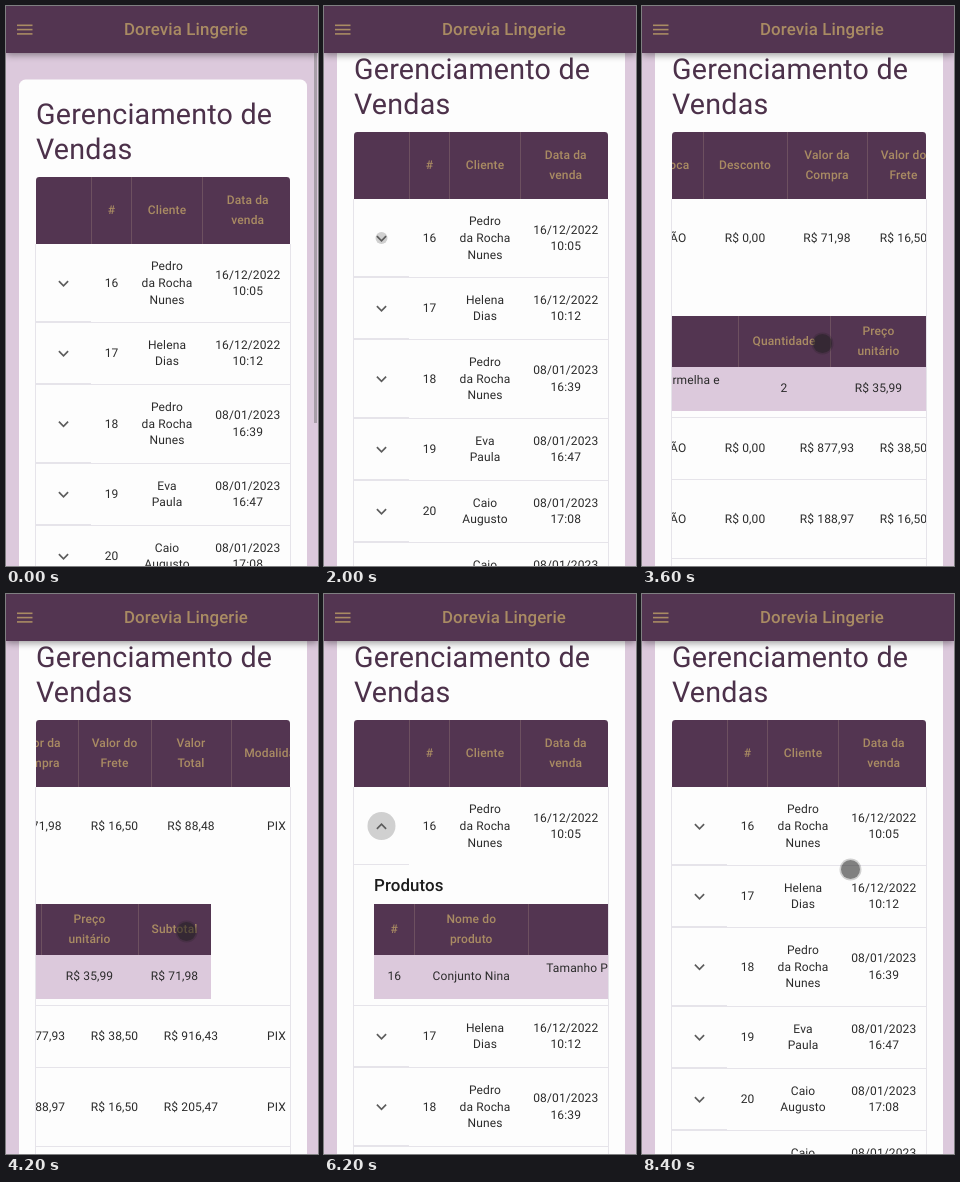
Recreate the animation shown at these times as an HTML page with a canvas. Size 312 by 560 pixels, loop 9200 ms.

```html
<!DOCTYPE html>
<html lang="pt-BR">
<head>
<meta charset="utf-8">
<title>Gerenciamento de Vendas</title>
<style>
html, body { margin: 0; width: 100%; height: 100%; overflow: hidden; background: #dcc9dc; }
canvas { display: block; }
</style>
</head>
<body>
<canvas id="stage" width="312" height="560"></canvas>
<script>
const ctx = document.getElementById('stage').getContext('2d');
ctx.textRendering = 'geometricPrecision';
const LOOP = 9200, STEP = 200;
const C = {
  page: '#dcc9dc', card: '#fdfdfd', bar: '#533551', gold: '#a98b63', rule: '#6d5060',
  line: '#e6e4ea', text: '#2b2b2b', title: '#4c314a', icon: '#5c5c5c', ripple: '#d0d0d0', ok: '#0a800a'
};
const CELL = 12, LINE = 16.9, HEAD_LINE = 20.2;

// Timelines as [ms, value] pairs, linear in between.
const PAGE_SCROLL = [[800, 0], [1000, 8], [1200, 24], [1400, 38], [1600, 45]];
const TABLE_SCROLL = [[2600, 0], [2800, 50], [3000, 134], [3400, 300], [3800, 450], [4200, 528],
  [4400, 528], [4600, 560], [4800, 560], [5000, 440], [5200, 270], [5400, 127], [5600, 50], [5800, 12], [6000, 0]];
const DETAILS = [[2000, 0], [2200, 60], [2400, 134], [2600, 140], [6800, 140], [7000, 125], [7200, 50], [7400, 5], [7600, 0]];
const RIPPLE = [[1800, 0], [2000, 6], [2200, 14], [7400, 14], [7800, 0]];

// Column edges in table coordinates.
const EDGES = [30, 85.5, 125.5, 196.5, 287, 377.5, 436, 520, 600, 673, 753, 844];
const HEADS = ['', '#', 'Cliente', 'Data da|venda', 'Data de|envio', 'Troca', 'Desconto',
  'Valor da|Compra', 'Valor do|Frete', 'Valor|Total', 'Modalidade'];
const SUB_EDGES = [50, 90.5, 204, 471, 563, 660, 733];
const SUB_HEADS = ['#', 'Nome do|produto', 'Descrição', 'Quantidade', 'Preço|unitário', 'Subtotal'];
const SUB_ROW = ['16', 'Conjunto Nina', 'Tamanho P e M, na cor branca, vermelha e|azul royal.', '2', 'R$ 35,99', 'R$ 71,98'];

const sale = (id, client, date, sent = 'check', ...values) =>
  ['', id, client, date, sent, 'NÃO', 'R$ 0,00', ...values, 'PIX'];
const ROWS = [
  { h: 78, cells: sale('16', 'Pedro|da Rocha|Nunes', '16/12/2022|10:05', '16/12/2022|10:06', 'R$ 71,98', 'R$ 16,50', 'R$ 88,48') },
  { h: 62, cells: sale('17', 'Helena|Dias', '16/12/2022|10:12', 'check', 'R$ 877,93', 'R$ 38,50', 'R$ 916,43') },
  { h: 79, cells: sale('18', 'Pedro|da Rocha|Nunes', '08/01/2023|16:39', 'check', 'R$ 188,97', 'R$ 16,50', 'R$ 205,47') },
  { h: 62, cells: sale('19', 'Eva|Paula', '08/01/2023|16:47') },
  { h: 62, cells: sale('20', 'Caio|Augusto', '08/01/2023|17:08') },
  { h: 62, cells: sale('21', 'Caio|Augusto', '08/01/2023|17:10') }
];

function track(t, keys) {
  if (t <= keys[0][0]) return keys[0][1];
  for (let i = 1; i < keys.length; i++) {
    const [t0, v0] = keys[i - 1], [t1, v1] = keys[i];
    if (t <= t1) return v0 + (v1 - v0) * (t - t0) / (t1 - t0);
  }
  return keys[keys.length - 1][1];
}

function rect(x, y, w, h, color) {
  ctx.fillStyle = color;
  ctx.fillRect(x, y, w, h);
}

function disc(x, y, r, color) {
  ctx.fillStyle = color;
  ctx.beginPath();
  ctx.arc(x, y, r, 0, Math.PI * 2);
  ctx.fill();
}

function stroke(points, color, width) {
  ctx.strokeStyle = color;
  ctx.lineWidth = width;
  ctx.beginPath();
  points.forEach(([x, y]) => ctx.lineTo(x, y));
  ctx.stroke();
}

function label(text, x, y, size, color, weight = 400, align = 'left', spacing = 0.0107) {
  ctx.font = `${weight} ${size}px Roboto, sans-serif`;
  ctx.letterSpacing = size * spacing + 'px';
  ctx.textAlign = align;
  ctx.fillStyle = color;
  ctx.fillText(text, x, y);
}

// Lines separated by "|" are centred around the point.
function cell(text, x, y, lineHeight, color, weight) {
  const lines = text.split('|');
  lines.forEach((line, i) =>
    label(line, x, Math.round(y + 4 + (i - (lines.length - 1) / 2) * lineHeight), CELL, color, weight, 'center'));
}

const center = (edges, i) => (edges[i] + edges[i + 1]) / 2;

function headRow(edges, heads, y, h) {
  const last = edges[edges.length - 1];
  rect(edges[0], y, last - edges[0], h, C.bar);
  heads.forEach((text, i) => {
    cell(text, center(edges, i), y + h / 2 - 0.5, HEAD_LINE, C.gold, 500);
    if (i) rect(Math.floor(edges[i]), y, 1, h, C.rule);
  });
}

function checkBox(x, y) {
  ctx.strokeStyle = C.ok;
  ctx.lineWidth = 2;
  ctx.beginPath();
  ctx.roundRect(x - 8.7, y - 8.7, 17.4, 17.4, 1.5);
  ctx.stroke();
  stroke([[x - 5, y], [x - 1.5, y + 3.5], [x + 5, y - 3.5]], C.ok, 1.8);
}

function chevron(x, y, up) {
  const d = up ? -2.3 : 2.3;
  stroke([[x - 4.6, y - d], [x, y + d], [x + 4.6, y - d]], C.icon, 1.7);
}

function details(y, h) {
  ctx.save();
  ctx.beginPath();
  ctx.rect(30, y, 814, h);
  ctx.clip();
  label('Produtos', 50, y + 26, 16.86, '#1c1c1c', 500, 'left', 0.0075);
  headRow(SUB_EDGES, SUB_HEADS, y + 39, 51);
  rect(50, y + 90, 683, 44, C.page);
  SUB_ROW.forEach((text, i) => cell(text, center(SUB_EDGES, i), y + 111, LINE, C.text));
  ctx.restore();
}

function table(t, top) {
  ctx.save();
  ctx.beginPath();
  ctx.roundRect(30, top, 254, 700, 3.4);
  ctx.clip();
  ctx.translate(-track(t, TABLE_SCROLL), 0);
  headRow(EDGES, HEADS, top, 67);
  let y = top + 67;
  ROWS.forEach(({ h, cells }, row) => {
    const mid = y + h / 2, open = row ? 0 : track(t, DETAILS);
    if (!row) disc(57.5, mid, track(t, RIPPLE), C.ripple);
    chevron(57.5, mid + 0.5, !row && t >= 2200 && t < 7000);
    cells.forEach((text, i) => {
      const x = center(EDGES, i);
      if (text === 'check') checkBox(x, mid);
      else cell(text, x, mid, LINE, C.text);
    });
    y += h;
    rect(30, y - 1, 55, 1, C.line);
    if (open) details(y, open);
    y += open;
    rect(30, y, 814, 1, C.line);
  });
  ctx.restore();
  rect(29, top + 67, 1, 600, C.line);
  rect(284, top + 67, 1, 600, C.line);
}

function appBar() {
  ctx.save();
  ctx.shadowColor = 'rgba(0,0,0,.4)';
  ctx.shadowBlur = 7;
  ctx.shadowOffsetY = 2;
  rect(0, 0, 312, 47, C.bar);
  ctx.restore();
  for (let i = 0; i < 3; i++) rect(11, 18.5 + i * 4.3, 15.5, 1.6, C.gold);
  label('Dorevia Lingerie', 180, 29, 16.86, C.gold, 500, 'center', 0.0075);
}

function pointer(x, y) {
  disc(x, y, 11, 'rgba(30,30,30,.2)');
  disc(x, y, 9.5, 'rgba(30,30,30,.45)');
}

function draw(t) {
  const scroll = track(t, PAGE_SCROLL);
  rect(0, 0, 312, 560, C.page);
  ctx.fillStyle = C.card;
  ctx.beginPath();
  ctx.roundRect(13, 73.5 - scroll, 288, 700, 6.7);
  ctx.fill();
  label('Gerenciamento de', 30, 118 - scroll, 28.67, C.title, 400, 'left', 0.00735);
  label('Vendas', 30, 153 - scroll, 28.67, C.title, 400, 'left', 0.00735);
  table(t, 171 - scroll);
  if (t < 2000) rect(308, 47 + scroll * 0.75, 3, 370, '#a89ea8');
  appBar();
  if (t >= 3400 && t < 6200) pointer(180.5, 337.5);
  if (t >= 8200) pointer(208.5, 275.5);
}

function frame() {
  const t = performance.now() % LOOP;
  draw(Math.floor(t / STEP) * STEP);
  requestAnimationFrame(frame);
}
frame();
</script>
</body>
</html>
```
